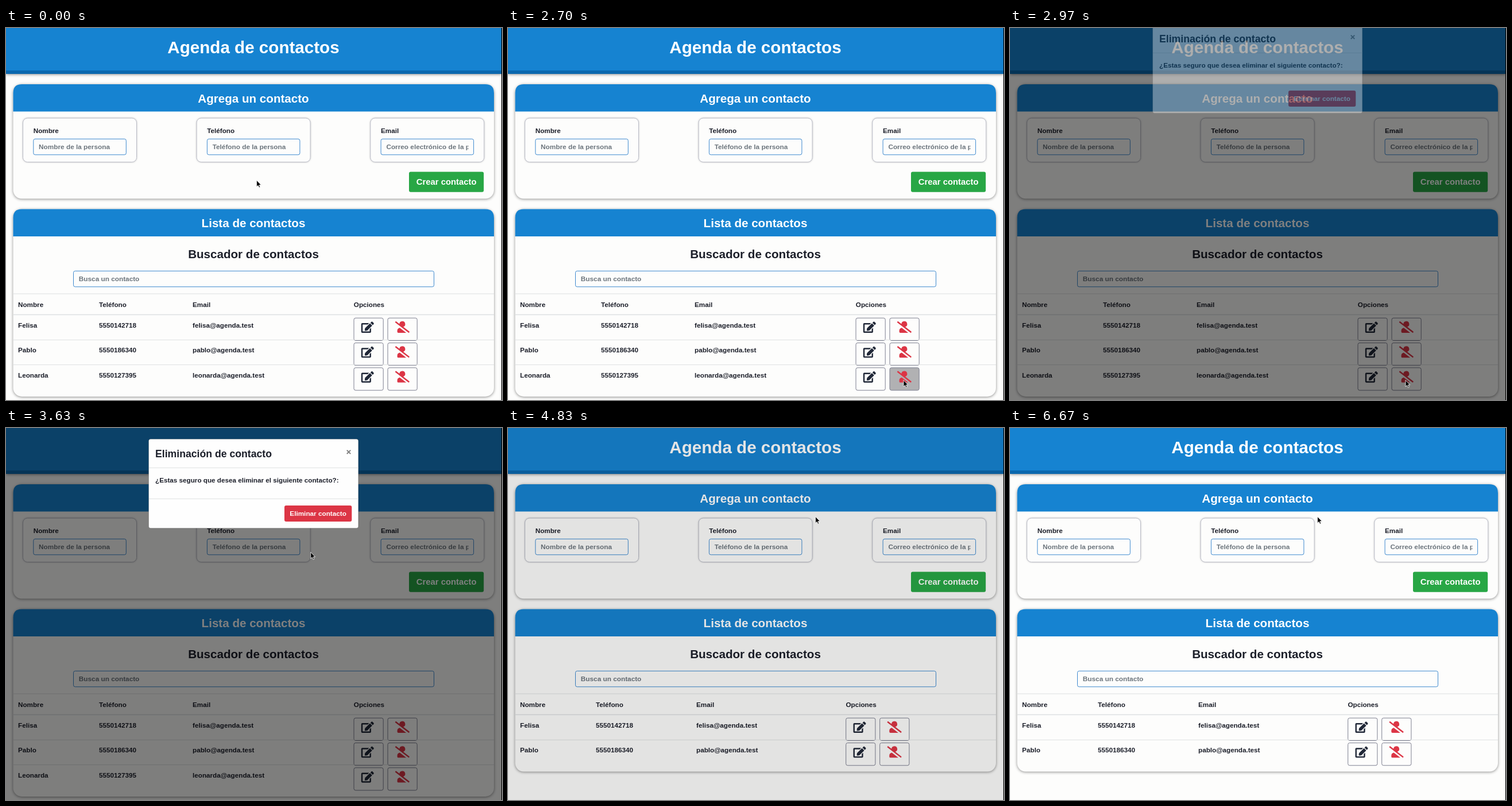
These frames come from a looping animation (864x648 px, 6.71 s). An HTML page:

```html
<!DOCTYPE html>
<html lang="es">
<head>
<meta charset="utf-8">
<title>Agenda de contactos</title>
<style>
html, body { margin: 0; width: 100%; height: 100%; overflow: hidden; background: #fdfdfc; }
svg { display: block; width: 100%; height: 100%; }
text { font: bold 11.7px "Liberation Sans", Arial, sans-serif; fill: #1c1f2a; white-space: pre; }
.shadow { filter: drop-shadow(0 1px 2.5px rgba(0, 0, 0, .45)); }
.soft { filter: drop-shadow(0 0 1.5px rgba(0, 0, 0, .22)); }
</style>
</head>
<body>
<svg id="stage" viewBox="0 0 864 648"></svg>
<script>
const LOOP = 6710;
const BLUE = '#1683d1', WHITE = '#fdfdfc', GREY = '#6c757d', RULE = '#dee0e2';
const PEN = 'M402.6 83.2l90.2 90.2c3.8 3.8 3.8 10 0 13.8L274.4 405.6l-92.8 10.3c-12.4 1.4-22.9-9.1-21.5-21.5l10.3-92.8L388.8 83.2c3.8-3.8 10-3.8 13.8 0z' +
  'M564.6 60.3l-48.8-48.8c-15.2-15.2-39.9-15.2-55.2 0l-35.4 35.4c-3.8 3.8-3.8 10 0 13.8l90.2 90.2c3.8 3.8 10 3.8 13.8 0l35.4-35.4c15.2-15.3 15.2-40 0-55.2z' +
  'M384 346V448H64V128h230q5 0 8-4l40-40c8-8 2-20-8-20H48Q0 64 0 112v352q0 48 48 48h352q48 0 48-48V306c0-11-13-16-20-8l-40 40q-4 3-4 8z';
const NO_USER = 'M634 458L362 248A128 128 0 1 0 193 117L45 3Q33-5 23 6L3 31Q-4 44 6 54l589 454q12 8 22-2l20-26q7-12-3-22z' +
  'M96 422V464q0 48 48 48h350L207 290Q96 315 96 422z';

const contacts = [
  ['Felisa', '5550142718', 'felisa@agenda.test'],
  ['Pablo', '5550186340', 'pablo@agenda.test'],
  ['Leonarda', '5550127395', 'leonarda@agenda.test']
];

const rect = (x, y, w, h, fill, r = 0, extra = '') =>
  `<rect x="${x}" y="${y}" width="${w}" height="${h}" rx="${r}" fill="${fill}" ${extra}/>`;
const text = (x, y, s, size = 11.7, fill = '#1c1f2a', anchor = 'start') =>
  `<text x="${x}" y="${y}" text-anchor="${anchor}" style="font-size:${size}px;fill:${fill}">${s}</text>`;
const line = (x1, x2, y, w = 1) => rect(x1, y - w / 2, x2 - x1, w, RULE);
const icon = (d, x, y, scale, fill) =>
  `<path d="${d}" transform="translate(${x} ${y}) scale(${scale})" fill="${fill}"/>`;
const input = (x, y, w, hint) =>
  rect(x, y, w, 27.5, WHITE, 3, 'stroke="#3d89cf"') +
  `<svg x="${x}" y="${y}" width="${w - 9}" height="28">${text(9.3, 18.1, hint, 11.8, GREY)}</svg>`;

function card(y, bottom, title) {
  return `<g class="shadow">${rect(12.5, y, 837.5, bottom - y, WHITE, 15)}</g>` +
    `<path d="M12.5 ${y + 47.6}V${y + 15}q0-15 15-15H835q15 0 15 15V${y + 47.6}z" fill="${BLUE}"/>` +
    text(431, y + 31.6, title, 20.6, '#fff', 'middle');
}

function field(x, label, hint) {
  return `<g class="soft">${rect(x, 157, 198, 76.5, WHITE, 8, 'stroke="#b9bbc6"')}</g>` +
    text(x + 18.2, 182.8, label) + input(x + 18.3, 193.3, 161.5, hint);
}

const opButton = (x, y) =>
  rect(x, y, 51.2, 39.3, WHITE, 3, 'class="op" stroke="#7d7f90"');

function list(id, rows, cols) {
  const xs = cols.slice(0, 3), ops = cols[3];
  let out = card(315.4, 512 + rows.length * 43.3, 'Lista de contactos') +
    text(431, 401.2, 'Buscador de contactos', 20.6, '#1c1f2a', 'middle') +
    input(117.5, 423.3, 628, 'Busca un contacto') +
    line(12.5, 850, 463) + line(12.5, 850, 499.4, 1.5);
  ['Nombre', 'Teléfono', 'Email', 'Opciones'].forEach((s, i) => out += text(cols[i], 485.5, s));
  rows.forEach((row, i) => {
    const y = i * 43.3;
    if (i) out += line(12.5, 850, 500 + y);
    row.forEach((s, k) => out += text(xs[k], 522.1 + y, s));
    out += opButton(ops + .2, 505.2 + y) + icon(PEN, ops + 13, 511.5 + y, .0382, '#212838') +
      opButton(ops + 59.2, 505.2 + y) + icon(NO_USER, ops + 72, 510.9 + y, .0392, '#dc3545');
  });
  return `<g id="${id}">${out}</g>`;
}

const modal = `<g id="modal">
  ${rect(248.5, 19.3, 365.3, 155.3, '#fefefe', 3.5, 'stroke="#000" stroke-opacity=".2"')}
  ${line(249, 613.5, 69.3)}${line(249, 613.5, 123.3)}
  ${text(260, 50.7, 'Eliminación de contacto', 17.65)}
  <path d="M593.8 38.6l6.4 6.4m0-6.4l-6.4 6.4" stroke="#808080" stroke-width="1.9"/>
  ${text(260, 94.8, '¿Estas seguro que desea eliminar el siguiente contacto?:')}
  ${rect(485, 135, 117.3, 28, '#dc3545', 3, 'id="confirm"')}
  ${text(543.6, 153.3, 'Eliminar contacto', 11.75, '#fff', 'middle')}
</g>`;

const stage = document.getElementById('stage');
stage.innerHTML = rect(0, 0, 864, 648, WHITE) +
  `<g class="shadow">${rect(0, 0, 863, 80, '#0b68ae')}</g>` + rect(0, 0, 863, 74, BLUE) +
  text(431, 44.3, 'Agenda de contactos', 29.6, '#fff', 'middle') +
  card(97.9, 297.3, 'Agrega un contacto') +
  field(29.5, 'Nombre', 'Nombre de la persona') +
  field(332.1, 'Teléfono', 'Teléfono de la persona') +
  field(634.8, 'Email', 'Correo electrónico de la persona') +
  rect(702, 250.5, 130.2, 35.2, '#28a745', 3) +
  text(767.2, 273.2, 'Crear contacto', 14.85, '#fff', 'middle') +
  list('full', contacts, [21, 162, 325, 605.8]) +
  list('short', contacts.slice(0, 2), [21, 153, 328, 588.5]) +
  rect(862.9, 0, 1.1, 648, '#000') +
  rect(0, 0, 864, 648, '#000', 0, 'id="shade"') + modal +
  '<path id="cursor" d="M0 0V11.3L2.6 8.9 4.3 12.8 6.1 12 4.5 8.2H7.9Z" fill="#000" stroke="#fff" stroke-width=".8"/>';

const el = Object.fromEntries(['full', 'short', 'shade', 'modal', 'confirm', 'cursor']
  .map(id => [id, document.getElementById(id)]));
const box = node => {
  const [x, y, w, h] = ['x', 'y', 'width', 'height'].map(a => +node.getAttribute(a));
  return { x, y, w, h };
};
const ops = [...document.querySelectorAll('.op')]
  .map(node => ({ node, group: node.closest('g').id, ...box(node) }));
const confirmBox = box(el.confirm);

const OPEN = 2765, CLOSE = 4562, FADE = 150, SLIDE = 300;
const path = [[600, 436.6, 265.3], [1900, 689, 613.5], [3080, 689, 613.5], [3630, 530.7, 216.3], [3980, 535.6, 154.4]];

const part = (t, start, span) => Math.min(1, Math.max(0, (t - start) / span));
const smooth = p => p * p * (3 - 2 * p);

// CSS ease-out: cubic-bezier(0, 0, .58, 1)
function easeOut(x) {
  let lo = 0, hi = 1;
  for (let i = 0; i < 20; i++) {
    const u = (lo + hi) / 2;
    if (1.74 * u * u * (1 - u) + u * u * u < x) lo = u; else hi = u;
  }
  return smooth(lo);
}

function pointer(t) {
  let [, x, y] = path[0];
  for (let i = 1; i < path.length; i++) {
    const [t0, x0, y0] = path[i - 1], [t1, x1, y1] = path[i];
    if (t < t0) break;
    const p = smooth(part(t, t0, t1 - t0));
    x = x0 + (x1 - x0) * p;
    y = y0 + (y1 - y0) * p;
  }
  return [x, y];
}

const inside = (x, y, b) => x > b.x && x < b.x + b.w && y > b.y && y < b.y + b.h;

function draw(t) {
  const removed = t >= CLOSE;
  const [x, y] = pointer(t);
  el.full.style.display = removed ? 'none' : '';
  el.short.style.display = removed ? '' : 'none';

  const shade = part(t, OPEN, FADE) - part(t, CLOSE + FADE, FADE);
  el.shade.setAttribute('opacity', shade / 2);
  const shown = OPEN + FADE;
  const alpha = part(t, shown, FADE) - part(t, CLOSE, FADE);
  const slide = easeOut(part(t, shown, SLIDE)) - easeOut(part(t, CLOSE, SLIDE));
  el.modal.setAttribute('opacity', alpha);
  el.modal.setAttribute('transform', `translate(0 ${-36.6 * (1 - slide)})`);

  const active = removed ? 'short' : 'full';
  for (const b of ops)
    b.node.setAttribute('fill', !shade && b.group === active && inside(x, y, b) ? '#b1b1b3' : WHITE);
  el.confirm.setAttribute('fill', inside(x, y, confirmBox) ? '#c82333' : '#dc3545');
  el.cursor.setAttribute('transform', `translate(${x} ${y})`);
}

const start = performance.now();
function tick() {
  draw((performance.now() - start) % LOOP);
  requestAnimationFrame(tick);
}
tick();
</script>
</body>
</html>
```
